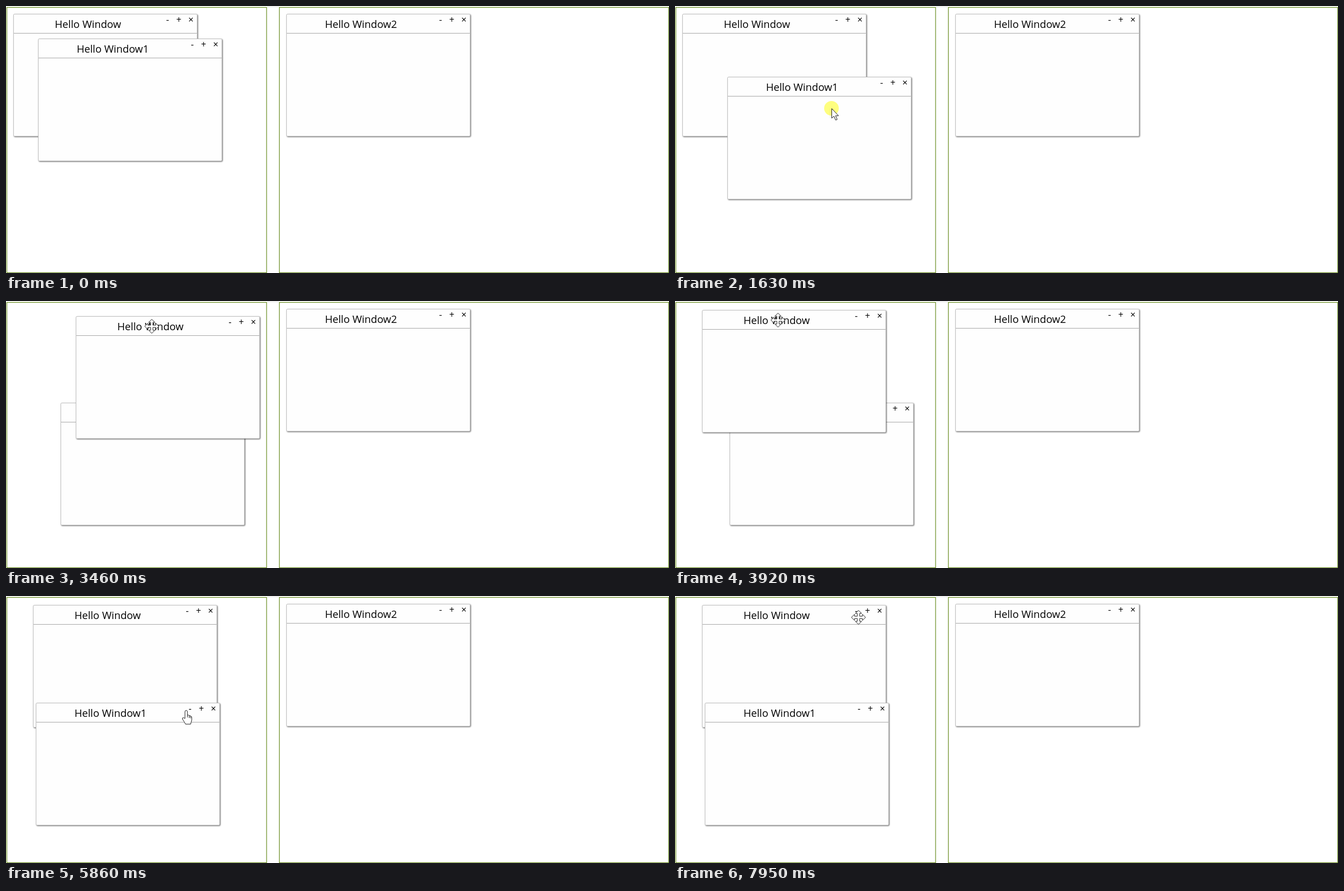
An HTML page for the animation above (8 s loop, 1178 by 475 pixels).

```html
<!DOCTYPE html>
<html lang="en">
<head>
<meta charset="utf-8">
<title>Draggable windows</title>
<style>
  html, body { margin: 0; width: 100%; height: 100%; overflow: hidden; background: #fff; }
  svg { display: block; width: 1178px; height: 475px; }
  text { font: 18.3px "Open Sans", "Noto Sans", sans-serif; text-anchor: middle; fill: #000; }
  .button { font-size: 16px; }
  .panel { fill: none; stroke: #6b8e23; stroke-width: 1.2; }
  .frame { fill: #fefefe; stroke: #c4c4c4; filter: drop-shadow(1px 1px 1.3px rgba(0, 0, 0, .6)); }
  .rule { stroke: #aaa; }
  #cursor path { fill: #fff; stroke: #222; stroke-width: 1; stroke-linejoin: round; }
  #glow { fill: #ffff80; mix-blend-mode: multiply; }
</style>
</head>
<body>
<svg viewBox="0 0 1178 475">
  <path d="M464 1.5H485" stroke="#ddd"/>
  <rect class="panel" x="1.5" y="2.5" width="461.5" height="472"/>
  <rect class="panel" x="485.7" y="2.5" width="691.8" height="472"/>
  <g id="desk"></g>
  <circle id="glow" r="13"/>
  <g id="cursor">
    <path id="arrow" d="M.5 .5V17.5L4.4 14L7.5 21L10.2 19.8L7.2 13.2H12.5Z"/>
    <path id="move" d="M0-12.5L5.5-7H2V-2H7V-5.5L12.5 0L7 5.5V2H2V7H5.5L0 12.5L-5.5 7H-2V2H-7V5.5L-12.5 0L-7-5.5V-2H-2V-7H-5.5Z"/>
    <path id="hand" d="M-2 14V2Q-2-.5 .2-.5T2.3 2V8Q5 7 5.5 9Q8 8 8 10Q10 10 10 12V17Q9 20 8 24H-1Q-3 20-6.5 15Q-7 12-4.5 12.5ZM2.3 8V12M5.5 9V13M8 10V13.5"/>
  </g>
</svg>
<script>
const LOOP = 8000, STEP = 77, WIDTH = 326, HEIGHT = 217, HEADER = 34, BUTTONS = 62;
const $ = id => document.getElementById(id);
const desk = $("desk");

function set(node, attributes) {
  for (const name in attributes) node.setAttribute(name, attributes[name]);
}

function make(parent, tag, attributes, content = "") {
  const node = document.createElementNS("http://www.w3.org/2000/svg", tag);
  set(node, attributes);
  node.textContent = content;
  return parent.appendChild(node);
}

function createWindow(title, left, top) {
  const group = make(desk, "g", {});
  const frame = make(group, "rect", { class: "frame", x: .5, y: .5, rx: 1.5 });
  const rule = make(group, "path", { class: "rule" });
  const label = make(group, "text", { y: 25 }, title);
  const buttons = make(group, "g", {});
  [["-", -52], ["+", -32], ["×", -10.5]].forEach(([sign, x]) =>
    make(buttons, "text", { class: "button", x, y: 15.7 }, sign));

  const win = {
    group,
    reset() { Object.assign(win, { x: left, y: top, folded: false, maximized: false }); },
    box() {
      if (win.maximized) return { x: 1, y: 2, w: 462, h: 472 };
      return { x: Math.round(win.x), y: Math.round(win.y), w: WIDTH, h: win.folded ? HEADER : HEIGHT };
    },
    render() {
      const { x, y, w, h } = win.box();
      set(group, { transform: `translate(${x} ${y})` });
      set(frame, { width: w, height: h });
      set(rule, { d: `M1 ${HEADER + .5}H${w}` });
      set(label, { x: (w - BUTTONS) / 2 + .7 });
      set(buttons, { transform: `translate(${w} 0)` });
    }
  };
  win.reset();
  win.render();
  return win;
}

const first = createWindow("Hello Window", 13, 14);
const second = createWindow("Hello Window1", 57, 58);
createWindow("Hello Window2", 498, 14);

const travel = (start, end, x, y, win) => ({ start, end, x, y, win });
const click = (start, action) => ({ start, end: start + STEP, action });

const script = [
  travel(350, 510, 99, 162),
  travel(660, 1060, 239, 88),
  travel(1210, 1690, 279, 211, second),
  travel(1910, 2530, 197, 30),
  travel(2612, 2920, 308, 43, first),
  travel(3230, 3460, 259, 45),
  travel(3537, 3920, 183, 34, first),
  travel(4140, 4530, 241, 284),
  click(4530, raise => raise(second)),
  travel(4770, 5080, 260, 196),
  travel(5240, 5490, 216, 205, second),
  travel(5630, 5860, 320, 204),
  click(6090, () => { second.folded = true; }),
  click(6320, () => { second.folded = false; }),
  travel(6480, 6560, 342, 203),
  click(6640, () => { second.maximized = true; }),
  travel(6720, 7260, 437, 17),
  click(7490, () => { second.maximized = false; }),
  travel(7567, 7950, 326, 38)
];

// The pointer swings sideways first, then up or down.
const easeOut = k => 1 - (1 - k) ** 1.75;
const easeIn = k => k ** 1.75;

function pointerShape(x, y, stack) {
  const box = stack.map(win => win.box())
    .find(b => x >= b.x && x < b.x + b.w && y >= b.y && y < b.y + b.h);
  if (!box || y - box.y >= HEADER) return "arrow";
  return x - box.x > box.w - BUTTONS && y - box.y < 20 ? "hand" : "move";
}

function draw(t) {
  let x = 908, y = 452, pressed = false, stack = [second, first];
  const raise = win => { stack = [win, ...stack.filter(other => other !== win)]; };
  first.reset();
  second.reset();

  for (const part of script.filter(p => p.start <= t)) {
    if (part.action) {
      part.action(raise);
      pressed = t < part.end;
      continue;
    }
    const { start, end, win } = part;
    const steps = Math.round((end - start) / STEP) + 1;
    const done = Math.min(steps, Math.floor((t - start) / (end - start) * (steps - 1) + .25) + 1);
    const dx = part.x - x, dy = part.y - y, k = done / steps;
    if (win) {
      // A dragged window trails the pointer by one step.
      const trail = k < 1 ? k - 1 / steps : 1;
      win.x += dx * easeOut(trail);
      win.y += dy * easeIn(trail);
      raise(win);
    }
    x += dx * easeOut(k);
    y += dy * easeIn(k);
    pressed = Boolean(win) && k < 1;
  }

  first.render();
  second.render();
  if (desk.lastChild !== stack[0].group) desk.append(stack[0].group);

  x = Math.round(x);
  y = Math.round(y);
  const shape = pointerShape(x, y, stack);
  for (const name of ["arrow", "move", "hand"])
    $(name).style.display = name === shape ? "" : "none";
  set($("cursor"), { transform: `translate(${x} ${y})`, visibility: t < script[0].start ? "hidden" : "visible" });
  set($("glow"), { cx: x, cy: y, visibility: pressed ? "visible" : "hidden" });
}

const origin = performance.now();
function tick() {
  draw((performance.now() - origin) % LOOP);
  requestAnimationFrame(tick);
}
tick();
</script>
</body>
</html>
```
